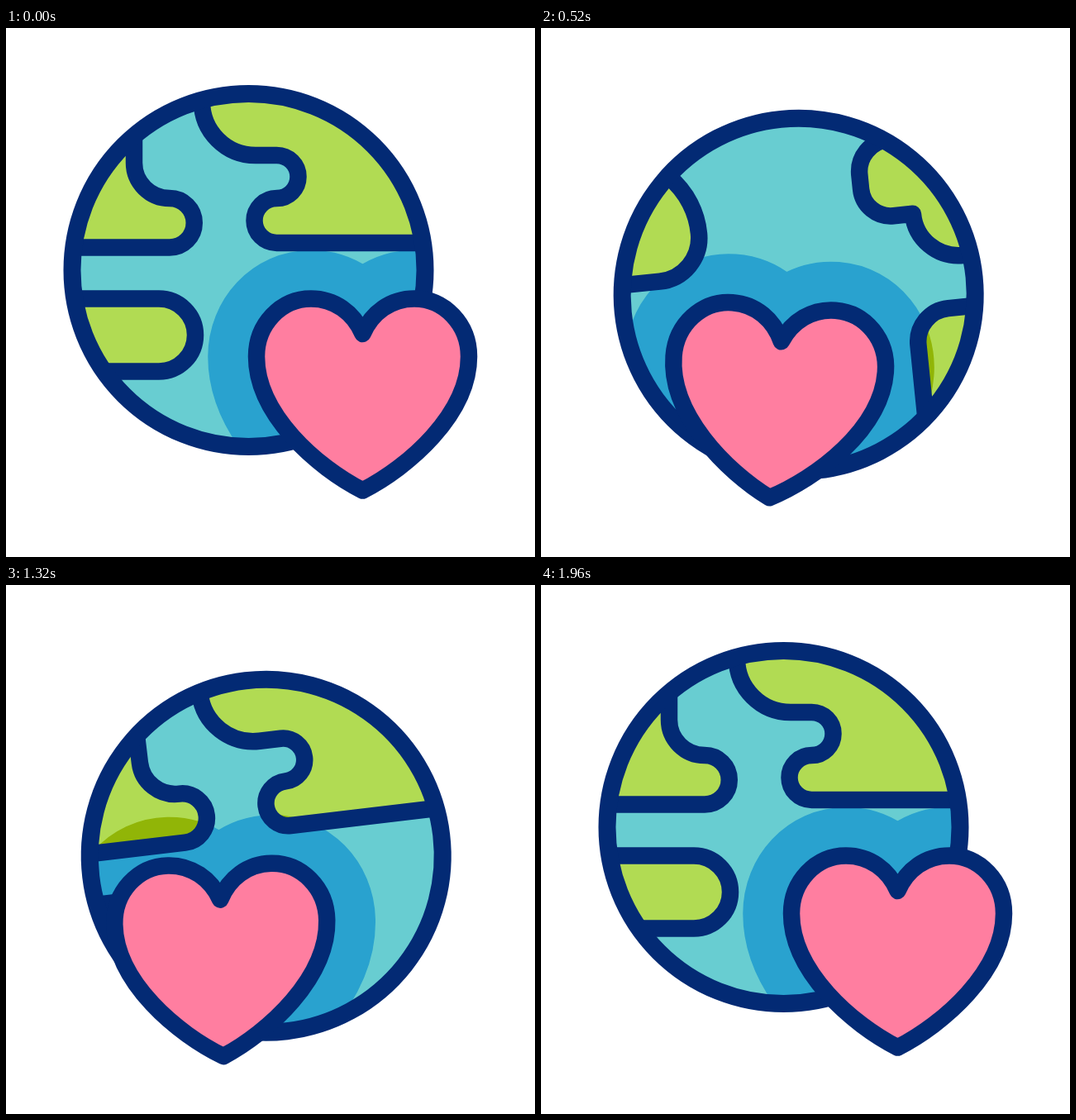
An HTML page with a canvas that plays this animation: 640 by 640 pixels, repeating every 2 s.

```html
<!DOCTYPE html>
<html lang="en">
<head>
<meta charset="utf-8">
<title>Globe and heart</title>
<style>
html, body { margin: 0; width: 100%; height: 100%; overflow: hidden; background: #fff; }
canvas { display: block; width: 640px; height: 640px; }
</style>
</head>
<body>
<canvas width="640" height="640"></canvas>
<script>
const ctx = document.querySelector('canvas').getContext('2d');
const NAVY = '#032a74', SEA = '#68cdd1', SHADE = '#29a2cf';
const GREEN = '#b1db53', OLIVE = '#91b507', PINK = '#ff7ea0';
const LOOP = 2000, LINE = 20.5, MAP_WIDTH = 845;

// All shapes are centred on the globe or the heart.
const heart = new Path2D(`M0-73.5C-11-99-34-116-62.5-116C-99-116-128.5-85-128.5-46
  C-128.5 24-55 88 0 116C55 88 128.5 24 128.5-46C128.5-85 99-116 62.5-116C34-116 11-99 0-73.5Z`);

const land = new Path2D(`M-227.6-176V-178A33 33 0 0 1-194.6-211H-171.5A33 33 0 0 1-138.5-178
  V-130A43 43 0 0 0-95.5-87A29.75 29.75 0 0 1-95.5-27.5H-212A55.5 55.5 0 0 1-267-83.5
  H-290.5A36 36 0 0 1-326.5-119.5V-137A39 39 0 0 1-287.5-176Z
  M-56.5-204A65 65 0 0 0 8.5-139H34A26 26 0 0 1 34-87A27 27 0 0 0 34-33
  H265A53 53 0 0 0 318-86A101 101 0 0 0 217-187.5H167V-240H-56.5Z
  M-236 34.5H-108.5A44 44 0 0 1-108.5 122.5H-190V240H-276.5V75A40.5 40.5 0 0 1-236 34.5Z`);

const disc = new Path2D();
disc.arc(0, 0, 213.5, 0, 7);

// Smooth 0..1 progress between two times.
function ease(t, from, to) {
  const u = Math.min(1, Math.max(0, (t - from) / (to - from)));
  return u * u * (3 - 2 * u);
}

// Rise and fall, 0..1..0.
function swing(t, from, to) {
  const mid = (from + to) / 2;
  return ease(t, from, mid) - ease(t, mid, to);
}

function stroke(path, color, width) {
  ctx.strokeStyle = color;
  ctx.lineWidth = width;
  ctx.stroke(path);
}

function fill(path, color) {
  ctx.fillStyle = color;
  ctx.fill(path);
}

function draw(now) {
  const t = now % LOOP;
  const away = ease(t, 80, 680) - ease(t, 1240, 1960);
  const scroll = 508 * ease(t, 100, 680) + 337 * ease(t, 680, 1230);
  const globeAt = new DOMMatrix().translate(293.5 + 22 * away, 293 + 36 * away).rotate(-7 * away);
  const heartAt = new DOMMatrix().translate(431.5 - 177 * away, 443.5 + 11 * away)
    .rotate(8 * swing(t, 80, 680) - 9 * swing(t, 1240, 1960))
    .scale(1 + 0.03 * swing(t, 680, 1240));

  const shadow = color => {
    ctx.setTransform(heartAt);
    fill(heart, color);
    stroke(heart, color, 117.5);
  };

  ctx.resetTransform();
  ctx.fillStyle = '#fff';
  ctx.fillRect(0, 0, 640, 640);
  ctx.lineJoin = 'round';

  ctx.save();
  ctx.setTransform(globeAt);
  ctx.clip(disc);
  fill(disc, SEA);
  shadow(SHADE);
  for (const x of [scroll, scroll - MAP_WIDTH]) {
    const mapAt = globeAt.translate(x, 0);
    ctx.save();
    ctx.setTransform(mapAt);
    fill(land, GREEN);
    ctx.clip(land);
    shadow(OLIVE);
    ctx.restore();
    ctx.setTransform(mapAt);
    stroke(land, NAVY, LINE);
  }
  ctx.restore();

  ctx.setTransform(globeAt);
  stroke(disc, NAVY, 21);

  ctx.setTransform(heartAt);
  fill(heart, PINK);
  stroke(heart, NAVY, LINE);
}

function tick() {
  draw(performance.now());
  requestAnimationFrame(tick);
}
tick();
</script>
</body>
</html>
```
